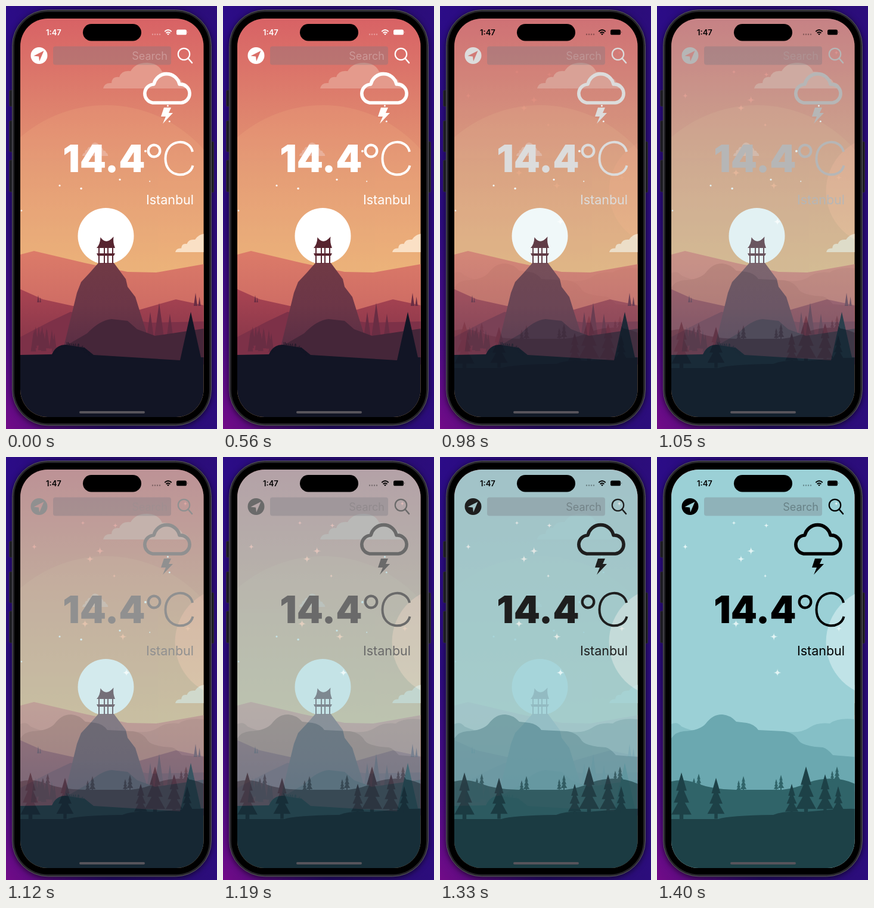
Animation, 354 px wide and 708 px high, one loop 2100 ms. Source, as an HTML page:

```html
<!DOCTYPE html>
<html lang="en">
<head>
<meta charset="utf-8">
<title>Weather theme fade</title>
<style>
  html, body { margin: 0; height: 100%; overflow: hidden; background: #240b68; }
  svg { display: block; width: 100%; height: 100%; }
  text { font-family: Inter, Roboto, sans-serif; fill: currentColor; }
  .end { text-anchor: end; }
  .line { fill: none; stroke: currentColor; }
  .body { filter: drop-shadow(0 2px 5px #0009); }
</style>
</head>
<body>
<svg viewBox="0 0 354 708">
  <defs>
    <linearGradient id="wall" x2="0" y2="1">
      <stop stop-color="#2c0c88"/><stop offset=".5" stop-color="#2b0c7c"/>
      <stop offset=".8" stop-color="#4c0c84"/><stop offset="1" stop-color="#720b88"/>
    </linearGradient>
    <linearGradient id="shade">
      <stop stop-color="#260c6c" stop-opacity="0"/><stop offset=".5" stop-color="#260c6c"/><stop offset="1" stop-color="#2c0d7c"/>
    </linearGradient>
    <linearGradient id="dusk" gradientUnits="userSpaceOnUse" x1="0" y1="21" x2="0" y2="450">
      <stop stop-color="#d86265"/><stop offset=".3" stop-color="#dd7d6c"/>
      <stop offset=".6" stop-color="#e39873"/><stop offset="1" stop-color="#ebb478"/>
    </linearGradient>
    <linearGradient id="far" x2="0" y2="1">
      <stop stop-color="#dc7b69"/><stop offset="1" stop-color="#c05d5f"/>
    </linearGradient>
    <linearGradient id="ridge" x2="0" y2="1">
      <stop stop-color="#a94452"/><stop offset="1" stop-color="#7c3247"/>
    </linearGradient>
    <linearGradient id="peak" x2="0" y2="1">
      <stop stop-color="#703a45"/><stop offset=".5" stop-color="#6c3647"/><stop offset="1" stop-color="#5a2e44"/>
    </linearGradient>
    <clipPath id="screen"><rect x="24" y="21" width="307.5" height="667" rx="46"/></clipPath>
    <path id="cloud" d="M0 0Q2-10 14-9Q15-21 27-19Q31-31 46-29Q55-44 75-43Q93-42 99-28Q114-29 118-17Q130-19 133-10Q143-9 144 0Z"/>
  </defs>

  <rect width="354" height="708" fill="url(#wall)"/>
  <rect width="354" height="708" fill="url(#shade)"/>
  <g fill="#24232b" stroke="#3b3944" stroke-width=".8">
    <rect x="5.5" y="141" width="7" height="27" rx="2"/>
    <rect x="5.5" y="192" width="7" height="52" rx="2"/>
    <rect x="5.5" y="258" width="7" height="53" rx="2"/>
    <rect x="342" y="227" width="6.5" height="85" rx="2"/>
  </g>
  <rect class="body" x="10.5" y="6.5" width="334" height="695.5" rx="60" fill="#26252a" stroke="#5a5960"/>
  <rect x="14" y="10" width="327" height="688.5" rx="56"/>

  <g clip-path="url(#screen)">
    <g id="sunset">
      <path fill="url(#dusk)" d="M24 21H332V688H24Z"/>
      <g id="halos" fill="#efb184" opacity=".22"></g>
      <use href="#cloud" x="163" y="138" fill="#e49a8c"/>
      <use href="#cloud" transform="translate(128 251) scale(.3 .52)" fill="#e9b09a"/>
      <use href="#cloud" transform="translate(284 412) scale(.72)" fill="#fae0c5"/>
      <g id="dots" fill="#fff"></g>
      <circle cx="167.500" cy="385" r="47" fill="#fff"/>
      <path fill="url(#far)" d="M24 416L47 410 132 430 204 445 252 446 332 432V600H24Z"/>
      <path fill="url(#ridge)" d="M24 474L62 491 112 502 222 509 285 491 332 501V600H24Z"/>
      <path fill="#7d3148" d="M24 554L74 528 108 512 244 530 332 528V600H24Z"/>
      <path id="spires" fill="#692d43"/>
      <path fill="url(#peak)" d="M155 430H181L201 457 204 470 217 487 243 570H97L119 480 126 462 141 446Z"/>
      <path fill="#452639" d="M98 570L136 548Q157 526 177 524L204 527 220 541 250 552 332 540V600H98Z"/>
      <path fill="#57242f" d="M158.500 387Q168 401 180.500 386Q179 396 183 405H152Q158 399 158.500 387ZM152 414H183L181 418H154Z"/>
      <path stroke="#57242f" stroke-width="2" d="M156 404V431M165 404V431M171 404V431M179 404V431"/>
      <path fill="#121525" d="M24 584L77 583Q84 567 100 567L132 572 147 584 292 593 310 512 327 588H332V688H24Z"/>
      <path id="grass" stroke="#121525" stroke-width=".8"/>
    </g>

    <g id="lagoon">
      <path fill="#9bd0d6" d="M24 21H332V688H24Z"/>
      <circle cx="375" cy="310" r="91.500" fill="#c0e3e7"/>
      <path id="sparkles" fill="#e2f4f4"/>
      <path fill="#85bfc6" d="M24 447Q34 442 41 451Q55 458 72 459H212Q240 464 257 452Q270 444 290 446Q303 436 332 439V560H24Z"/>
      <path fill="#6ba8b0" d="M24 471Q31 460 45 459Q72 458 82 446Q94 430 110 431Q123 432 133 443L150 445Q163 447 170 457L212 459Q230 461 238 475Q245 484 278 486Q286 488 295 499L332 502V600H24Z"/>
      <path fill="#306469" d="M24 543Q45 538 66 546Q95 557 132 557H210Q235 554 250 546Q295 530 332 547V640H24Z"/>
      <path id="backTrees" fill="#306469"/>
      <path fill="#1d4147" d="M24 606H103Q120 600 195 599Q212 592 250 594Q312 588 332 589V688H24Z"/>
      <path id="frontTrees" fill="#1d4147"/>
    </g>

    <g id="ui">
      <path fill="currentColor" fill-rule="evenodd" d="M55.500 69A14 14 0 0 1 55.500 97A14 14 0 0 1 55.500 69ZM63.500 75L46.500 83.500 55 84.500 56 92.500Z"/>
      <rect x="79" y="67.500" width="198" height="31" rx="4" fill="#787880" fill-opacity=".34"/>
      <text class="end" x="271" y="90" font-size="18" opacity=".27">Search</text>
      <g class="line">
        <circle cx="298.500" cy="80.500" r="9.700" stroke-width="2.200"/>
        <path d="M305.500 87.500L312 95" stroke-width="2.600" stroke-linecap="round"/>
        <path d="M246 162H294A15.500 15.500 0 0 0 291 131A22 22 0 0 0 248 131A15.600 15.600 0 0 0 246 162Z" stroke-width="5.600" stroke-linejoin="round"/>
        <circle cx="248.500" cy="242.500" r="9.800" stroke-width="4.300"/>
        <path d="M313 244C308 220 268 222 267.500 255C267 288 308 290 313.500 267" stroke-width="4"/>
      </g>
      <path fill="currentColor" d="M265 170H277L273 179H280L263 197 268 185H260Z"/>
      <text class="end" x="233.500" y="278" font-size="63" font-weight="900">14.4</text>
      <text class="end" x="315" y="332" font-size="21.500">Istanbul</text>
    </g>

    <g id="status" fill="currentColor">
      <text x="67" y="49" font-size="13" font-weight="600">1:47</text>
      <path class="line" opacity=".35" stroke-width="2.400" stroke-linecap="round" stroke-dasharray="0 4" d="M246 47.500H259"/>
      <path class="line" stroke-width="1.900" d="M266.300 42.700Q272 37.500 277.700 42.700M268.600 45.400Q272 42.200 275.400 45.400"/>
      <path d="M270 46.800Q272 45.200 274 46.800L272 48.800Z"/>
      <rect x="286" y="39.500" width="17" height="8.800" rx="2.600"/>
      <path d="M304 42.300Q305.800 43.900 304 45.500Z" opacity=".6"/>
    </g>
    <rect x="123" y="678" width="110" height="4" rx="2" fill="#57545b"/>
  </g>
  <rect x="129" y="30" width="98" height="28.500" rx="14.250"/>
</svg>

<script>
const $ = id => document.getElementById(id);
const repeat = (count, make) => Array.from({ length: count }, (_, i) => make(i)).join('');
const circle = (x, y, r) => `<circle cx="${x}" cy="${y}" r="${r}"/>`;

let seed = 7;
const random = (low, high) => {
  seed = seed * 16807 % 2147483647;
  return low + (high - low) * seed / 2147483647;
};

const spire = (x, tip, height) =>
  `M${x} ${tip}L${x + height * .14} ${tip + height}H${x - height * .14}Z`;

// Three stacked triangles on a trunk
const pine = (x, tip, height) => repeat(3, i => {
  const top = tip + height * .25 * i, reach = height * (.11 + .05 * i);
  return `M${x} ${top}L${x + reach} ${top + height * .38}H${x - reach}Z`;
}) + `M${x - height * .04} ${tip + height * .8}h${height * .08}v${height * .2}h${-height * .08}Z`;

const sparkle = (x, y, r) =>
  `M${x} ${y - r}Q${x} ${y} ${x + r} ${y}Q${x} ${y} ${x} ${y + r}Q${x} ${y} ${x - r} ${y}Q${x} ${y} ${x} ${y - r}Z`;

$('halos').innerHTML = repeat(4, i => circle(167.5, 385, 66 + 42 * i + 3 * i * i));
$('dots').innerHTML = repeat(8, () => circle(random(26, 330), random(140, 360), random(1, 2)));
$('sparkles').setAttribute('d', repeat(11, () => sparkle(random(30, 328), random(60, 390), random(2.5, 7))));

const groves = [[257, 497, 60], [242, 512, 45], [318, 480, 22], [54, 484, 12]];
$('spires').setAttribute('d',
  groves.map(([x, tip, height]) => spire(x, tip, height) + spire(x + height * .3, tip + height * .3, height * .7)).join('')
  + repeat(12, () => spire(random(28, 105), random(530, 548), 32)));

$('grass').setAttribute('d', repeat(26, i =>
  `M${79 + i * 2.4} ${585 - 16 * Math.sin(i / 25 * Math.PI)}l${random(-2, 2)} ${random(-7, -3)}`));

const backPairs = [[70, 530], [145, 534], [208, 532], [302, 518]];
$('backTrees').setAttribute('d', backPairs.map(([x, tip]) =>
  pine(x, tip, 25) + pine(x - 8, tip + 7, 19)).join(''));

const frontTips = [[41, 528], [99, 537], [226, 547], [250, 518], [282, 531], [304, 551]];
$('frontTrees').setAttribute('d', frontTips.map(([x, tip]) =>
  pine(x, tip, 610 - x * .045 - tip)).join(''));

const LOOP = 2100, STEP = 70, FADE_START = 915, FADE_LENGTH = 470, STATUS_FLIP = 840;
const start = performance.now();

function draw() {
  const time = (performance.now() - start) % LOOP;
  const tick = Math.floor(time / STEP) * STEP;
  const fade = Math.min(1, Math.max(0, (tick - FADE_START) / FADE_LENGTH));
  const shade = Math.round(255 * (1 - fade));
  $('lagoon').setAttribute('opacity', fade);
  $('ui').style.color = `rgb(${shade},${shade},${shade})`;
  $('status').style.color = tick < STATUS_FLIP ? '#fff' : '#000';
  requestAnimationFrame(draw);
}
draw();
</script>
</body>
</html>
```
